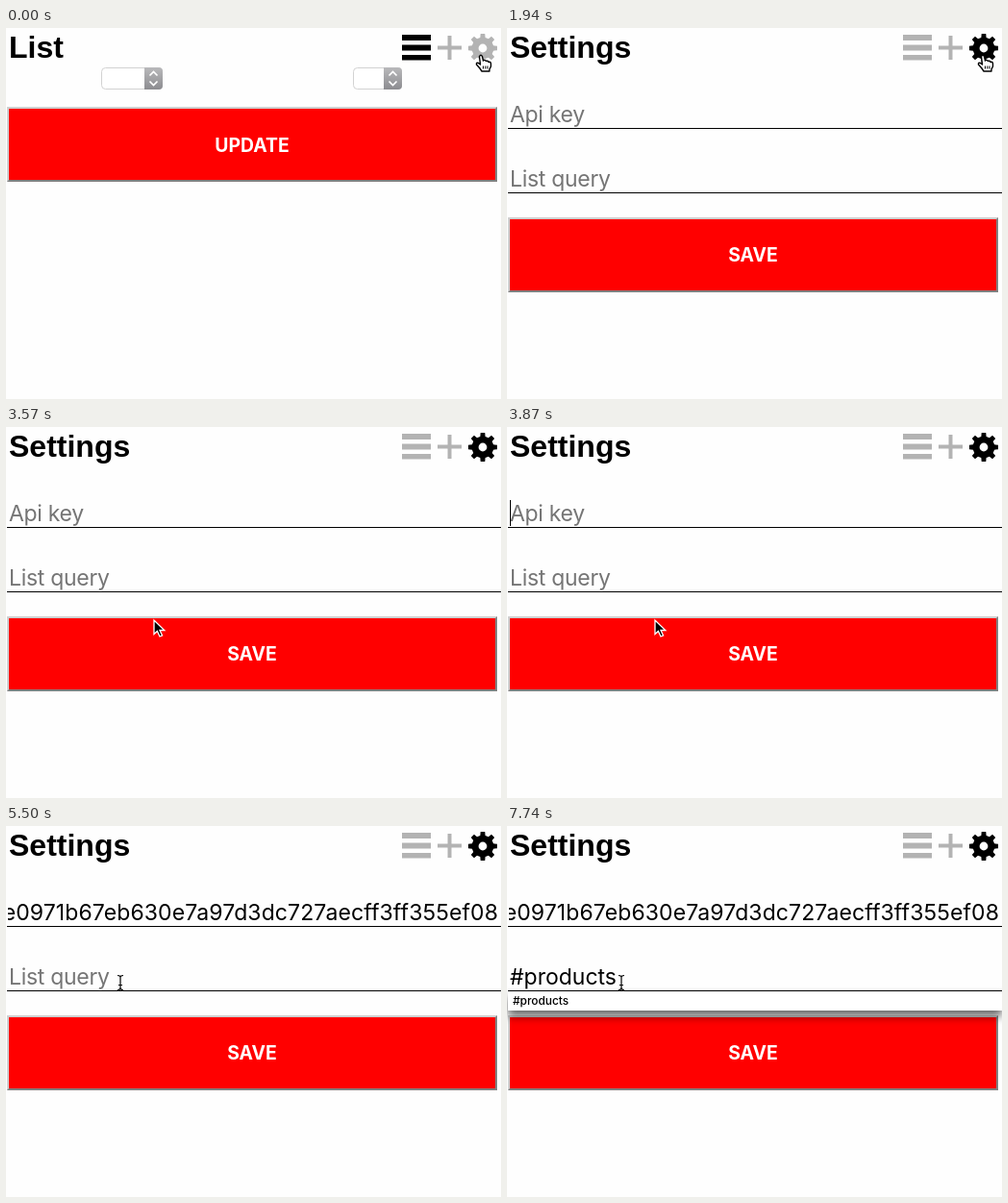
An HTML page that plays this animation: 515x386 px, repeating every 8000 ms.

```html
<!DOCTYPE html>
<html lang="en">
<head>
<meta charset="utf-8">
<title>List settings</title>
<style>
  html, body { margin: 0; height: 100%; overflow: hidden; background: #fefefe; }
  svg { display: block; width: 100%; height: 100%; }
  text { white-space: pre; }
  .title { font: bold 32px "Liberation Sans", Arial, sans-serif; }
  .field { font: 23px Inter, sans-serif; }
  .hint { fill: #757575; letter-spacing: -.3px; }
  #key { letter-spacing: .1px; }
  .option { font: 500 11.9px Inter, sans-serif; }
  .label { font: bold 19.4px Inter, sans-serif; fill: #fff; text-anchor: middle; }
  .popup rect { fill: #fff; filter: drop-shadow(0 6px 5px rgba(0, 0, 0, .6)); }
  .off { display: none; }
</style>
</head>
<body>
<svg viewBox="0 0 515 386">
  <defs>
    <linearGradient id="knob" x2="0" y2="1">
      <stop stop-color="#b9b9bb"/><stop offset="1" stop-color="#8c8c90"/>
    </linearGradient>
    <clipPath id="fieldClip"><rect x="2" y="70" width="511" height="34"/></clipPath>
    <g id="button">
      <rect width="510" height="78" fill="#808080"/>
      <path d="M0 78V0H510L508 2H2V76Z" fill="#cfcfcf"/>
      <rect x="2" y="2" width="506" height="74" fill="#f00"/>
    </g>
    <path id="chevrons" d="M-4 -3L0 -7L4 -3M-4 3L0 7L4 3" fill="none" stroke="#fff" stroke-width="1.7"/>
    <path id="beamShape" d="M-3 -7.5Q0 -7.5 0 -5.5V5.5Q0 7.5-3 7.5M3 -7.5Q0 -7.5 0 -5.5V5.5Q0 7.5 3 7.5M-2 2.5H2"
      fill="none" stroke="#000" stroke-width="1.2"/>
  </defs>

  <text id="title" class="title" x="3" y="31"></text>
  <path id="bars" d="M412 7h30v6h-30zM412 17.5h30v6h-30zM412 28h30v5.5h-30z"/>
  <path d="M449 18.5h10.5V8h4v10.5H474v4H463.5V33h-4V22.5H449z" fill="#b3b3b3"/>
  <path id="gear" fill-rule="evenodd" transform="translate(496 21)"/>

  <g id="listPage">
    <g id="selects"></g>
    <use href="#button" x="1" y="82"/>
    <text class="label" x="256" y="129">UPDATE</text>
  </g>

  <g id="settingsPage">
    <text id="keyHint" class="field hint" x="3" y="98">Api key</text>
    <g clip-path="url(#fieldClip)"><text id="key" class="field" x="512" y="98" text-anchor="end"></text></g>
    <text id="queryHint" class="field hint" x="3" y="165">List query</text>
    <text id="query" class="field" x="3" y="165"></text>
    <path d="M1 104.5H515M1 171.5H515" stroke="#000"/>
    <use href="#button" x="1" y="197"/>
    <text class="label" x="256" y="243">SAVE</text>
    <g id="keyPopup" class="popup">
      <rect x="1" y="105" width="514" height="20"/>
      <text id="keyOption" class="option" x="6" y="119"></text>
    </g>
    <g id="queryPopup" class="popup">
      <rect x="1" y="172" width="514" height="20"/>
      <text class="option" x="6" y="186">#products</text>
    </g>
    <rect id="caret" width="1" height="27"/>
  </g>

  <g id="hand" stroke-linejoin="round">
    <path d="M-1.5 1.5Q0 -1 1.5 1.5L2.5 6Q4 4.5 5.5 6.5Q7 5.5 8 7.5Q10 6.5 10.5 9V12L9 15V17H1L-1 14L-4.5 10Q-5 7.5-2.5 8.5L-.5 10Z" fill="#fff" stroke="#000" stroke-width="1.4"/>
    <path d="M2.5 11.5v3M4.8 11.5v3M7 11.5v3" stroke="#000"/>
  </g>
  <path id="arrow" d="M0 0V14.5L3.4 11.4L6 17L8.6 15.9L6 10.5H10.8Z" stroke="#fff" stroke-width="1.3"/>
  <g id="beam">
    <use href="#beamShape"/>
    <use id="beamTrail" href="#beamShape" x="1" y="-6"/>
  </g>
</svg>
<script>
const LOOP = 8000;
const KEY = 'e0971b67eb630e7a97d3dc727aecff3ff355ef08';
const QUERY = '#products';
const KEYSTROKES = [5650, 6100, 6400, 6550, 6700, 7000, 7140, 7440, 7590];
// time, pointer shape, x, y
const POINTER = [
  [0, 'hand', 494, 28], [150, 'hand', 495, 28],
  [2240, 'arrow', 468, 52], [2390, 'arrow', 350, 98], [2540, 'arrow', 230, 122],
  [2690, 'beam', 160, 100], [2840, 'beam', 135, 93],
  [3270, 'arrow', 142, 120], [3420, 'arrow', 152, 180], [3570, 'arrow', 154, 201],
  [4170, 'arrow', 148, 186], [4310, 'arrow', 138, 176],
  [4610, 'beam', 125, 158], [4750, 'beam', 121, 156], [4900, 'beam', 119, 163]
];
const $ = id => document.getElementById(id);
const show = (id, on) => $(id).classList.toggle('off', !on);
const within = (t, from, to) => t >= from && t < to;

function gearPath(teeth, inner, outer, hole) {
  const step = 2 * Math.PI / teeth, points = [];
  for (let i = 0; i < teeth; i++) {
    for (const [offset, r] of [[-.3, inner], [-.19, outer], [.19, outer], [.3, inner]]) {
      const a = (i + offset) * step;
      points.push((r * Math.cos(a)).toFixed(2) + ' ' + (r * Math.sin(a)).toFixed(2));
    }
  }
  return `M${points.join('L')}ZM${hole} 0A${hole} ${hole} 0 1 0 ${-hole} 0A${hole} ${hole} 0 1 0 ${hole} 0Z`;
}

function selectBox(x, width) {
  const right = x + width, split = right - 19;
  return `<rect x="${x + .5}" y="41.5" width="${width - 1}" height="22" rx="4" fill="#fff" stroke="#d2d2d2"/>
    <path d="M${split} 41H${right - 4}q4 0 4 4V60q0 4-4 4H${split}Z" fill="url(#knob)"/>
    <use href="#chevrons" x="${split + 9.5}" y="52.5"/>`;
}

$('gear').setAttribute('d', gearPath(8, 11.4, 15.2, 4.4));
$('selects').innerHTML = selectBox(99, 64) + selectBox(361, 51);
$('key').textContent = $('keyOption').textContent = KEY;

function drawCaret(t, typed) {
  const inKey = within(t, 2980, 3570) || within(t, 3870, 4900);
  const inQuery = within(t, 4900, 5500) || within(t, 5650, 7740);
  show('caret', inKey || inQuery);
  const queryEnd = typed ? 3 + $('query').getComputedTextLength() : 3;
  $('caret').setAttribute('x', inQuery ? Math.round(queryEnd) : t < 4020 ? 3 : 512);
  $('caret').setAttribute('y', inQuery ? 143 : 76);
}

function drawPointer(t) {
  const [, shape, x, y] = POINTER.findLast(p => t >= p[0]);
  for (const id of ['hand', 'arrow', 'beam']) show(id, id === shape);
  $(shape).setAttribute('transform', `translate(${x} ${y})`);
  show('beamTrail', within(t, 4610, 4900));
}

function draw(t) {
  const settings = t >= 1940, pasted = t >= 4020;
  const typed = KEYSTROKES.filter(k => t >= k).length;
  $('title').textContent = settings ? 'Settings' : 'List';
  $('bars').setAttribute('fill', settings ? '#b3b3b3' : '#000');
  $('gear').setAttribute('fill', settings ? '#000' : '#b3b3b3');
  show('listPage', !settings);
  show('settingsPage', settings);
  show('keyHint', !pasted);
  show('key', pasted);
  show('keyPopup', within(t, 4170, 4900));
  show('queryHint', !typed);
  $('query').textContent = QUERY.slice(0, typed);
  show('queryPopup', typed);
  drawCaret(t, typed);
  drawPointer(t);
}

const start = performance.now();
function frame() {
  draw((performance.now() - start) % LOOP);
  requestAnimationFrame(frame);
}
frame();
</script>
</body>
</html>
```
